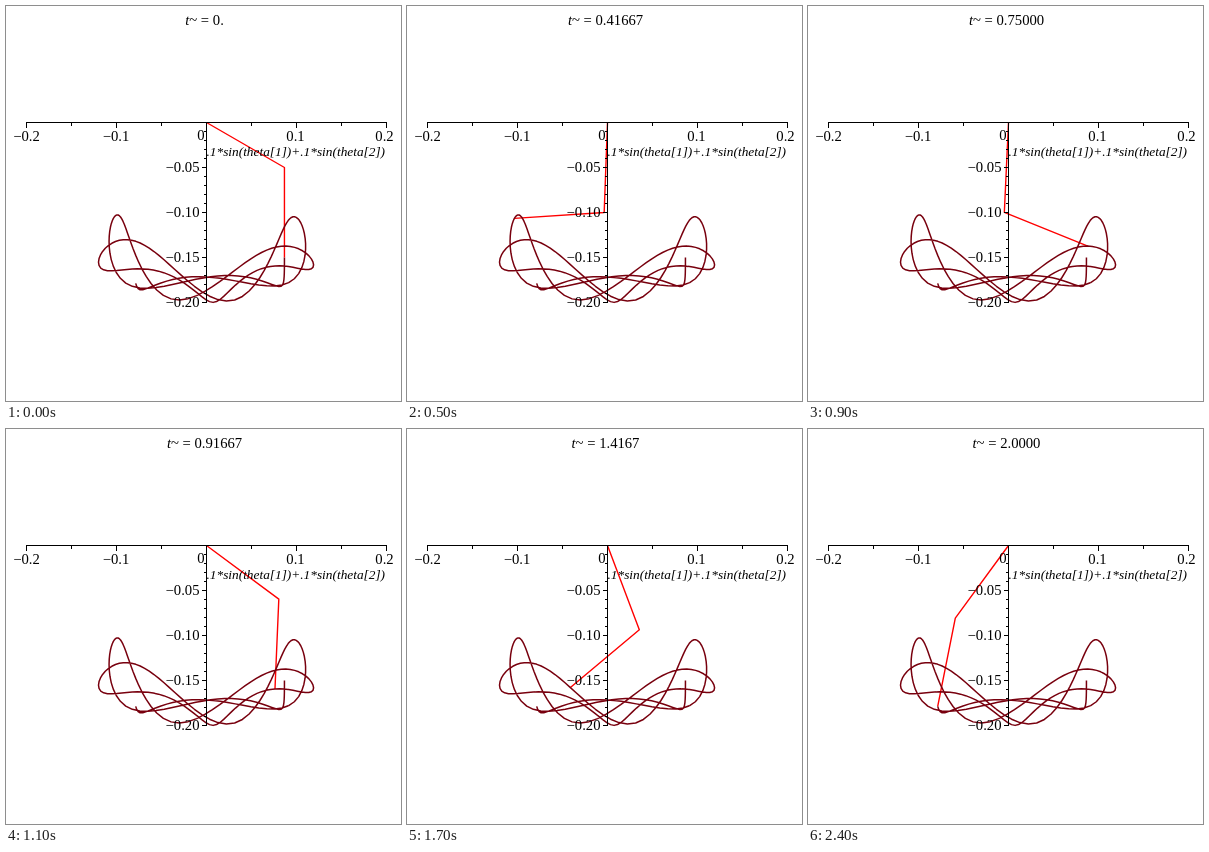
Recreate the animation shown at these times as an HTML page. Size 395 px wide and 395 px high, loop 2500 ms.

```html
<!DOCTYPE html>
<html lang="en">
<head>
<meta charset="utf-8">
<title>Double pendulum</title>
<style>
  html, body { margin: 0; width: 100%; height: 100%; overflow: hidden; background: #fff; }
  svg { display: block; width: 395px; height: 395px; }
  text { font: 14.67px "Liberation Serif", "Times New Roman", serif; fill: #000; }
  .mid { text-anchor: middle; }
  .end { text-anchor: end; }
  .it { font-style: italic; }
  #name { font-size: 13.33px; }
  path { fill: none; stroke-linejoin: round; }
  #arms { stroke: #f00; stroke-width: 1.4; }
  #trace { stroke: #78000e; stroke-width: 1.5; }
  #axes { stroke: #000; stroke-width: 1; shape-rendering: crispEdges; }
</style>
</head>
<body>
<svg viewBox="0 0 395 395">
  <path id="arms"/>
  <path id="trace"/>
  <path id="axes"/>
  <g id="labels"></g>
  <text id="name" class="it" x="200.5" y="150">.1*sin(theta[1])+.1*sin(theta[2])</text>
  <text class="mid" x="198.5" y="19"><tspan class="it">t</tspan>~ = <tspan id="time">0.</tspan></text>
</svg>
<script>
const $ = id => document.getElementById(id);
const OX = 200.5, OY = 116.5, SCALE = 900;   // plot origin, pixels per metre
const LEN = 0.1, G = 9.81;
const FRAMES = 25, FRAME_MS = 100, FPS = 12; // FPS: frames per simulated second
const SUB = 100, DT = 1 / (FPS * SUB);

// Equal masses, equal lengths; state is [theta1, theta2, omega1, omega2].
function slope([p, q, u, v]) {
  const c = Math.cos(p - q), s = Math.sin(p - q), k = G / LEN;
  const r = u * u * s - k * Math.sin(q);
  const a = (-2 * k * Math.sin(p) - v * v * s - c * r) / (2 - c * c);
  return [u, v, a, r - a * c];
}

const add = (y, d, h) => y.map((x, i) => x + d[i] * h);

function rk4(y) {
  const a = slope(y);
  const b = slope(add(y, a, DT / 2));
  const c = slope(add(y, b, DT / 2));
  const d = slope(add(y, c, DT));
  return y.map((x, i) => x + DT / 6 * (a[i] + 2 * b[i] + 2 * c[i] + d[i]));
}

function joints([p, q]) {
  const r = LEN * SCALE;
  const x = OX + r * Math.sin(p), y = OY + r * Math.cos(p);
  return [[x, y], [x + r * Math.sin(q), y + r * Math.cos(q)]];
}

const line = points => "M" + points.map(p => p.map(n => n.toFixed(2)).join()).join("L");

// Run the whole motion once: poses for each frame and the path of the lower mass.
const poses = [], tips = [];
let state = [Math.PI / 3, 0, 0, 0];
for (let i = 0; i <= (FRAMES - 1) * SUB; i++) {
  if (i % SUB === 0) poses.push(line([[OX, OY], ...joints(state)]));
  if (i % 10 === 0) tips.push(joints(state)[1]);
  state = rk4(state);
}
$("trace").setAttribute("d", line(tips));

function label(str, x, y, cls) {
  const t = document.createElementNS("http://www.w3.org/2000/svg", "text");
  t.setAttribute("x", x);
  t.setAttribute("y", y);
  t.setAttribute("class", cls);
  t.textContent = str;
  $("labels").append(t);
}

let axes = `M20 ${OY}H381M${OX} 116V297`;
for (let i = -4; i <= 4; i++) {
  axes += `M${OX + i * 45} ${OY}v${i % 2 ? 3 : 5}`;
}
for (let i = 1; i <= 20; i++) {
  axes += `M${OX} ${OY + i * 9}h${i % 5 ? -3 : -5}`;
}
$("axes").setAttribute("d", axes);

label("\u22120.2", 20.5, 135, "mid");
label("\u22120.1", 110, 135, "mid");
label("0", 195, 134, "mid");
label("0.1", 289.5, 135, "mid");
label("0.2", 378.5, 135, "mid");
for (let i = 1; i <= 4; i++) {
  label("\u2212" + (i * 0.05).toFixed(2), 193.5, OY + i * 45 + 4.5, "end");
}

const start = performance.now();
let shown = -1;
function draw() {
  const n = Math.floor((performance.now() - start) / FRAME_MS) % FRAMES;
  if (n !== shown) {
    shown = n;
    $("arms").setAttribute("d", poses[n]);
    $("time").textContent = n ? (n / FPS).toPrecision(5) : "0.";
  }
  requestAnimationFrame(draw);
}
draw();
</script>
</body>
</html>
```
